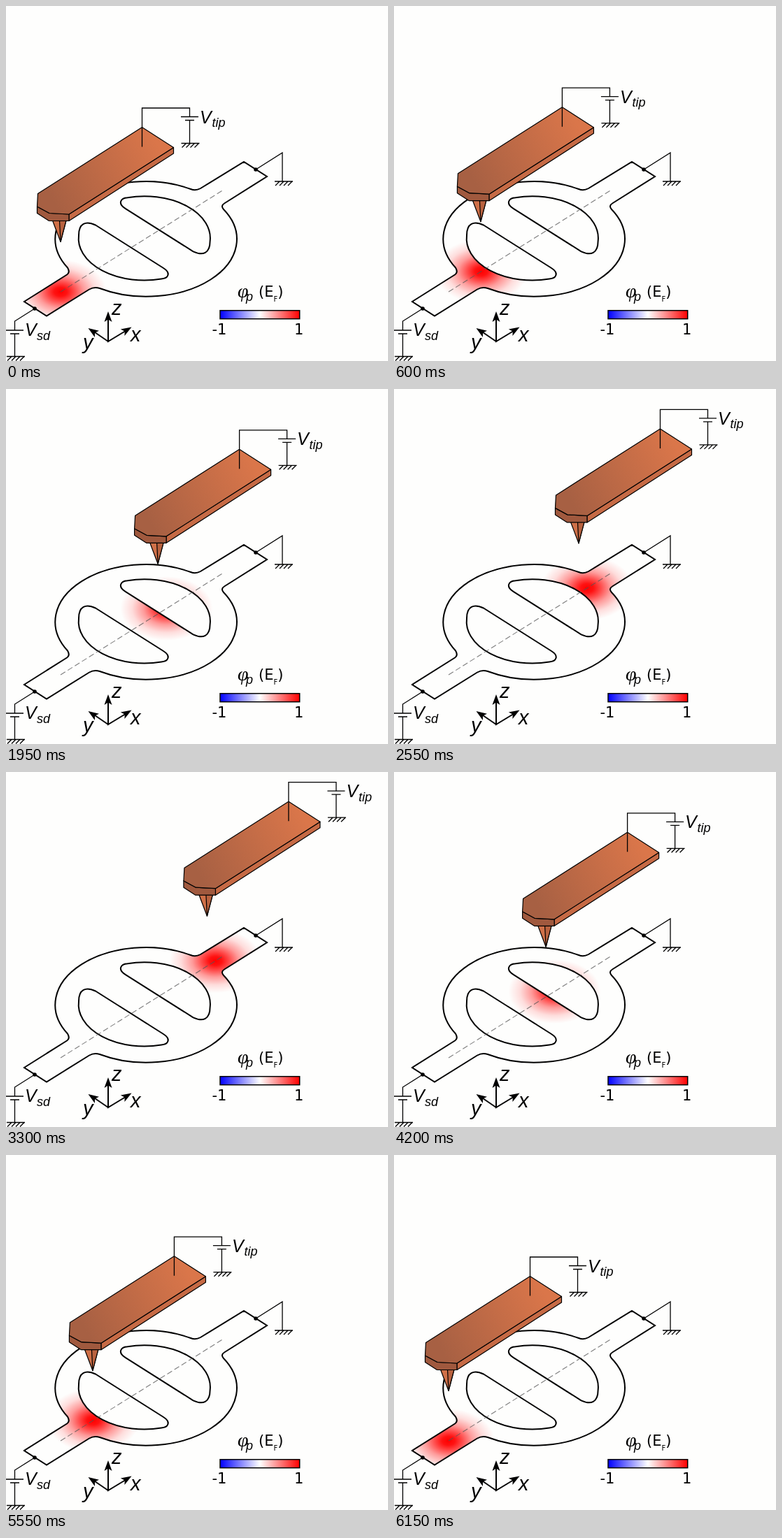
An HTML page that plays this animation: 546 px wide and 508 px high, repeating every 6300 ms.

```html
<!DOCTYPE html>
<html lang="en">
<head>
<meta charset="utf-8">
<title>Scanning gate over a quantum ring</title>
<style>
html, body { margin: 0; width: 100%; height: 100%; overflow: hidden; background: #fefefd; }
svg { display: block; width: 546px; height: 508px; }
.line { fill: none; stroke: #000; stroke-width: 1.3; }
.edge { fill: none; stroke: #000; stroke-width: 2; stroke-linejoin: miter; }
.body { stroke: #000; stroke-width: 1.2; stroke-linejoin: round; }
.it { font: italic 25px "Liberation Sans", Arial, sans-serif; }
.sub { font-size: 18px; }
.axis { font-size: 29px; }
.phi { font: italic 28px "Liberation Serif", serif; }
.num { font: 21px "DejaVu Sans", sans-serif; }
</style>
</head>
<body>
<svg viewBox="0 0 546 508">
  <defs>
    <radialGradient id="heat">
      <stop offset="0" stop-color="#f00"/>
      <stop offset=".14" stop-color="#f00" stop-opacity=".93"/>
      <stop offset=".3" stop-color="#f00" stop-opacity=".7"/>
      <stop offset=".5" stop-color="#f00" stop-opacity=".39"/>
      <stop offset=".75" stop-color="#f00" stop-opacity=".13"/>
      <stop offset="1" stop-color="#f00" stop-opacity="0"/>
    </radialGradient>
    <linearGradient id="copper" gradientUnits="userSpaceOnUse" x1="65" y1="275" x2="215" y2="195">
      <stop offset="0" stop-color="#a76043"/>
      <stop offset="1" stop-color="#da764a"/>
    </linearGradient>
    <linearGradient id="scale">
      <stop offset="0" stop-color="#00f"/>
      <stop offset=".5" stop-color="#fff"/>
      <stop offset="1" stop-color="#f00"/>
    </linearGradient>
    <path id="ring" d="M26 423L87 384.500Q92 381 88 374.500A129.300 82 0 0 1 264 262Q271 265 278 261L340 223L373 244L312 282.500Q306.500 286 311 291A129.300 82 0 0 1 134 404Q126 401.500 119 405.500L58 443.500Z"/>
    <path id="hole" d="M128 313.500L225 375Q233 380 231.500 385Q230 390 222 390.500A94 59.800 0 0 1 104 328C104 311 114 307 128 313.500Z"/>
    <path id="ground" class="line" d="M0 0H26M7 0l-6 6M13 0l-6 6M19 0l-6 6M25 0l-6 6"/>
    <path id="cell" class="line" d="M-12.500 0H12.500M-6.500 5H6.500M0 5V38"/>
    <path id="head" d="M0 0L-15 -5.500L-11.500 0L-15 5.500Z"/>
    <clipPath id="inside"><use href="#ring"/></clipPath>
  </defs>

  <g clip-path="url(#inside)">
    <ellipse id="spot" rx="66" ry="46" fill="url(#heat)"/>
  </g>
  <g fill="#fefefd" stroke="#000" stroke-width="2">
    <use href="#hole"/>
    <use href="#hole" transform="rotate(180 197.800 332.400)"/>
  </g>
  <use href="#ring" class="edge"/>
  <path d="M78 409L311 263" fill="none" stroke="#555" stroke-opacity=".75" stroke-width="1.100" stroke-dasharray="8 4"/>

  <path class="line" d="M357 234L395 210V251M41 433L12.500 451V464"/>
  <circle cx="357" cy="234" r="2.800"/>
  <circle cx="41" cy="433" r="2.800"/>
  <use href="#ground" x="384" y="251"/>
  <use href="#cell" x="12.500" y="464"/>
  <use href="#ground" x="1" y="501.500"/>
  <text class="it" x="27" y="472.300">V<tspan class="sub" x="44" y="477.500">sd</tspan></text>

  <path class="edge" d="M146 448V480L170 465.500M146 480L127 467"/>
  <use href="#head" transform="translate(146 437) rotate(-90)"/>
  <use href="#head" transform="translate(179.500 459.500) rotate(-31)"/>
  <use href="#head" transform="translate(117.500 461) rotate(214)"/>
  <g class="it">
    <text class="axis" x="151" y="441.500">z</text>
    <text class="axis" x="178" y="479.500">x</text>
    <text class="axis" x="110" y="491">y</text>
    <text class="phi" x="331" y="416.500">φ</text>
    <text class="sub" x="343" y="421.500">p</text>
  </g>
  <rect x="306" y="435.700" width="113.700" height="12" fill="url(#scale)" stroke="#000" stroke-width="1.500"/>
  <g class="num">
    <text x="361" y="416.300">(E<tspan font-size="10" dy="7">F</tspan><tspan dy="-7">)</tspan></text>
    <text x="294.500" y="469.500">-1</text>
    <text x="412" y="469.500">1</text>
  </g>

  <g id="probe">
    <path class="body" fill="#cf7048" d="M66.500 307H86L78 337.500Z"/>
    <path class="body" fill="#b9623f" d="M76.500 307H86L78 337.500Z"/>
    <path class="body" fill="#c66a45" d="M239.500 202.500V211L90 307.500V298Z"/>
    <path class="body" fill="#a0593e" d="M44.500 287L62 296.500L90 298V307.500H61.500L44.500 296.500Z"/>
    <path class="body" fill="url(#copper)" d="M194.500 173.500L239.500 202.500L90 298L62 296.500L44.500 287L45.500 268.500Z"/>
    <path class="line" d="M194.500 201.500V146H262.500V158.500"/>
    <use href="#cell" x="262.500" y="158.500"/>
    <use href="#ground" x="250.500" y="196.500"/>
    <text class="it" x="277" y="167.500">V<tspan class="sub" x="294.500" y="173">tip</tspan></text>
  </g>
</svg>
<script>
const STEP = 150, COUNT = 42;
const spot = document.getElementById("spot");
const probe = document.getElementById("probe");

// The probe pauses for one step, then trails the spot.
function probeShift(i) {
  if (i < 8) return 11.48 * Math.min(i, 6);
  return Math.min(80.5 + 11.72 * (i - 8), 220.5);
}

function draw(now) {
  const k = Math.floor(now / STEP) % COUNT;
  const i = Math.min(k, COUNT - 1 - k);
  const dx = probeShift(i);
  spot.setAttribute("transform", `translate(${78 + 11.65 * i} ${409 - 7.3 * i})`);
  probe.setAttribute("transform", `translate(${dx} ${-0.627 * dx})`);
}

const start = performance.now();
function tick() {
  draw(performance.now() - start);
  requestAnimationFrame(tick);
}
tick();
</script>
</body>
</html>
```
